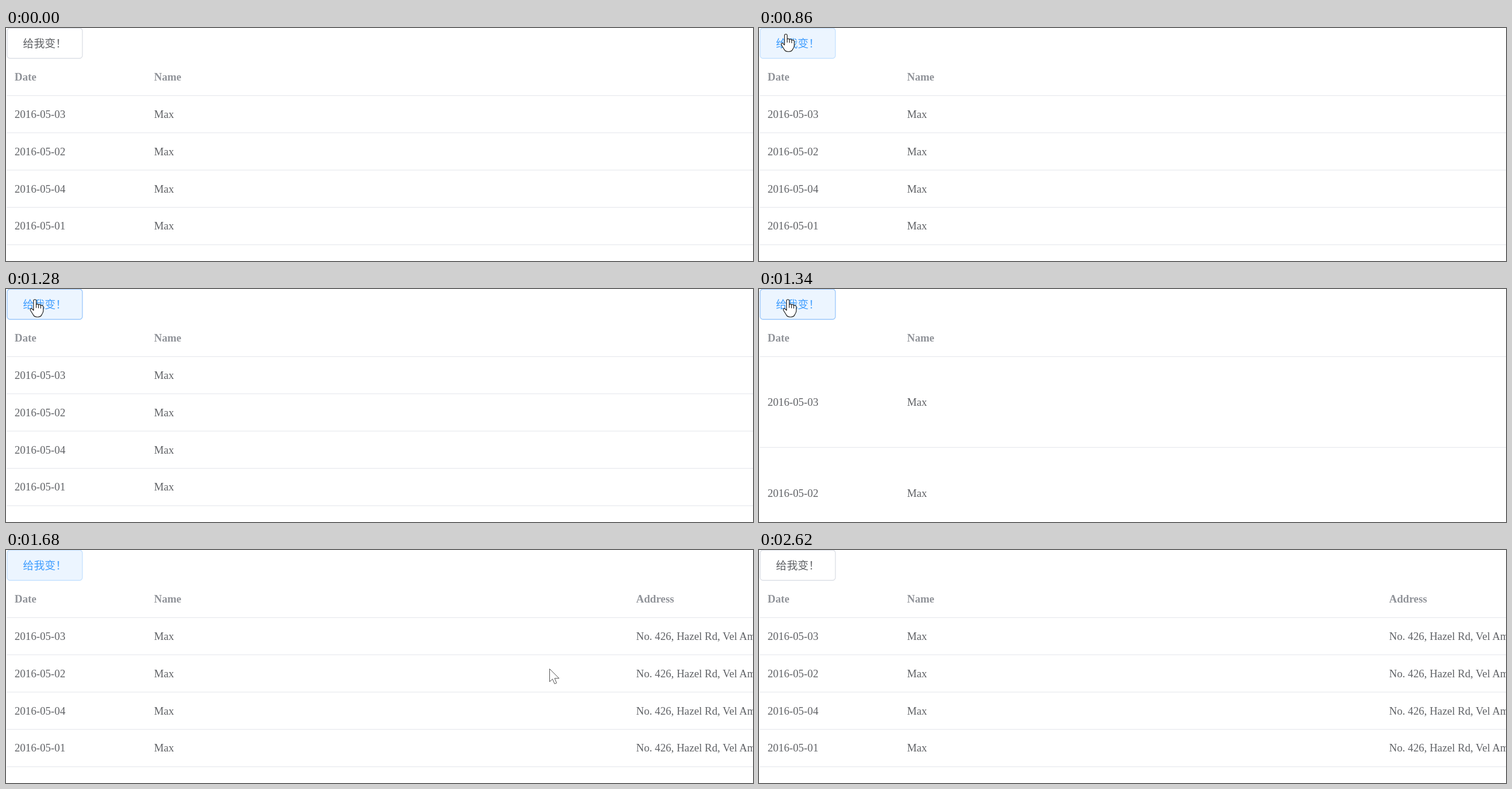
Write an HTML page that moves like this. It is 1280 by 399 pixels and loops after 2690 ms.

```html
<!DOCTYPE html>
<html lang="zh-CN">
<head>
<meta charset="utf-8">
<title>Table columns</title>
<style>
html, body { margin: 0; width: 100%; height: 100%; overflow: hidden; background: #fff; }
svg { display: block; width: 100%; height: 100%; }
text { font: 18.67px "Liberation Serif", "Times New Roman", serif; fill: #606266; }
.head { font-weight: bold; fill: #909399; }
.label { font-family: "Noto Sans CJK SC", "Noto Sans CJK", sans-serif; }
.line { fill: #e9ebef; }
.cursor { fill: #fff; stroke-linejoin: round; stroke-linecap: round; }
</style>
</head>
<body>
<svg id="stage" viewBox="0 0 1280 399" preserveAspectRatio="none"></svg>
<script>
const LOOP = 2690, TOP = 116.2, ROW = 63.9, TALL = 155.8;
const DATES = ['2016-05-03', '2016-05-02', '2016-05-04', '2016-05-01'];
const PERSON = 'Max', PLACE = 'No. 426, Hazel Rd, Vel Amoria';

// Pointer poses as captured: start time, shape, tip x, tip y.
const POSES = [
  [0], [190, 'arrow', 681, 318], [260, 'arrow', 330, 112], [330],
  [590, 'hand', 40, 1], [660, 'hand', 42, 4], [730, 'hand', 44, 7],
  [790, 'hand', 45, 9], [860, 'hand', 46, 10.5], [920, 'hand', 47, 13],
  [990, 'hand', 48, 16], [1070, 'hand', 49.5, 18],
  [1480, 'hand', 52, 22], [1540, 'arrow', 190, 52], [1610, 'arrow', 520, 88],
  [1680, 'arrow', 931.5, 204], [1750, 'arrow', 1015, 250], [1820, 'arrow', 1070, 300],
  [1890, 'arrow', 1104, 342], [1960, 'arrow', 1120, 376], [2030]
];
// Button hover amount over time.
const HOVER = [[0, 0], [590, .5], [660, 1], [2560, .5], [2620, 0]];

const stage = document.getElementById('stage');

function add(tag, attrs, parent = stage, content = '') {
  const el = document.createElementNS('http://www.w3.org/2000/svg', tag);
  for (const key in attrs) el.setAttribute(key, attrs[key]);
  el.textContent = content;
  return parent.appendChild(el);
}
const put = (el, x, y) => el.setAttribute('transform', `translate(${x} ${y})`);
const show = (el, on) => el.setAttribute('visibility', on ? 'visible' : 'hidden');
const at = (list, t) => list.filter(k => k[0] <= t).pop();
const mix = (a, b, p) => `rgb(${a.map((v, i) => Math.round(v + (b[i] - v) * p))})`;
const line = (y, parent) => add('rect', { class: 'line', x: 1.5, y, width: 1280, height: 1.33 }, parent);

const button = add('rect', { x: 2, y: .3, width: 128.9, height: 51.7, rx: 4.8, 'stroke-width': 1.33 });
const label = add('text', { class: 'label', x: 29, y: 32.7 }, stage, '给我变！');

const heading = (x, s) => add('text', { class: 'head', x, y: 90 }, stage, s);
heading(14.7, 'Date');
heading(253.7, 'Name');
const extra = [heading(1079.7, 'Address')];
line(115, stage);

const rows = DATES.map(date => {
  const g = add('g', {});
  const cell = (x, s) => add('text', { x, y: 6.3 }, g, s);
  cell(14.7, date);
  cell(253.7, PERSON);
  extra.push(cell(1079.7, PLACE));
  return { g, rule: line(0, stage) };
});

// Both pointers are drawn with the tip at the origin.
const pointers = {
  arrow: add('g', { class: 'cursor', stroke: '#555', 'stroke-width': 1 }),
  hand: add('g', { class: 'cursor', stroke: '#222', 'stroke-width': 1.2 })
};
add('path', { d: 'M0 0V21.5L5 17L8.6 25.2L12 23.7L8.6 15.8H15.8Z' }, pointers.arrow);
add('path', {
  d: 'M-2.3 2.5Q-2.3 0 0 0Q2.3 0 2.3 2.5V8.5Q3.8 7 6.2 8.8Q8.2 7.8 10 10' +
     'Q14.4 9.6 14.4 13V19.5Q14.4 22 12 25.5Q10.5 30 4.5 30Q-1.5 30 -3.2 25.5' +
     'L-7.6 18.5Q-8.6 15 -5.6 15.4L-2.3 18.5Z'
}, pointers.hand);
add('path', { d: 'M2.3 8.5V14M6.2 9V14.5M10 10.2V15', fill: 'none' }, pointers.hand);

const flash = add('circle', { cx: 50, cy: 18, r: 16.3, fill: '#ffff80', style: 'mix-blend-mode:multiply' });

function draw(t) {
  const hover = at(HOVER, t)[1];
  const pressed = t >= 1270 && t < 1480;
  button.setAttribute('fill', mix([255, 255, 255], [236, 245, 255], hover));
  button.setAttribute('stroke', pressed ? '#9cc8fb' : mix([220, 223, 230], [198, 226, 255], hover));
  label.style.fill = mix([96, 98, 102], [64, 158, 255], hover);

  // The new column briefly stretches the rows before it settles.
  const height = t >= 1340 && t < 1410 ? TALL : ROW;
  rows.forEach(({ g, rule }, i) => {
    put(g, 0, TOP + height * (i + .5) - .7);
    put(rule, 0, TOP + height * (i + 1) - 1.33);
  });
  extra.forEach(el => show(el, t >= 1410));

  const [, shape, x, y] = at(POSES, t);
  for (const name in pointers) {
    show(pointers[name], name === shape);
    if (name === shape) put(pointers[name], x, y);
  }
  show(flash, t >= 1140 && t < 1220);
}

const start = performance.now();
function tick() {
  draw((performance.now() - start) % LOOP);
  requestAnimationFrame(tick);
}
tick();
</script>
</body>
</html>
```
